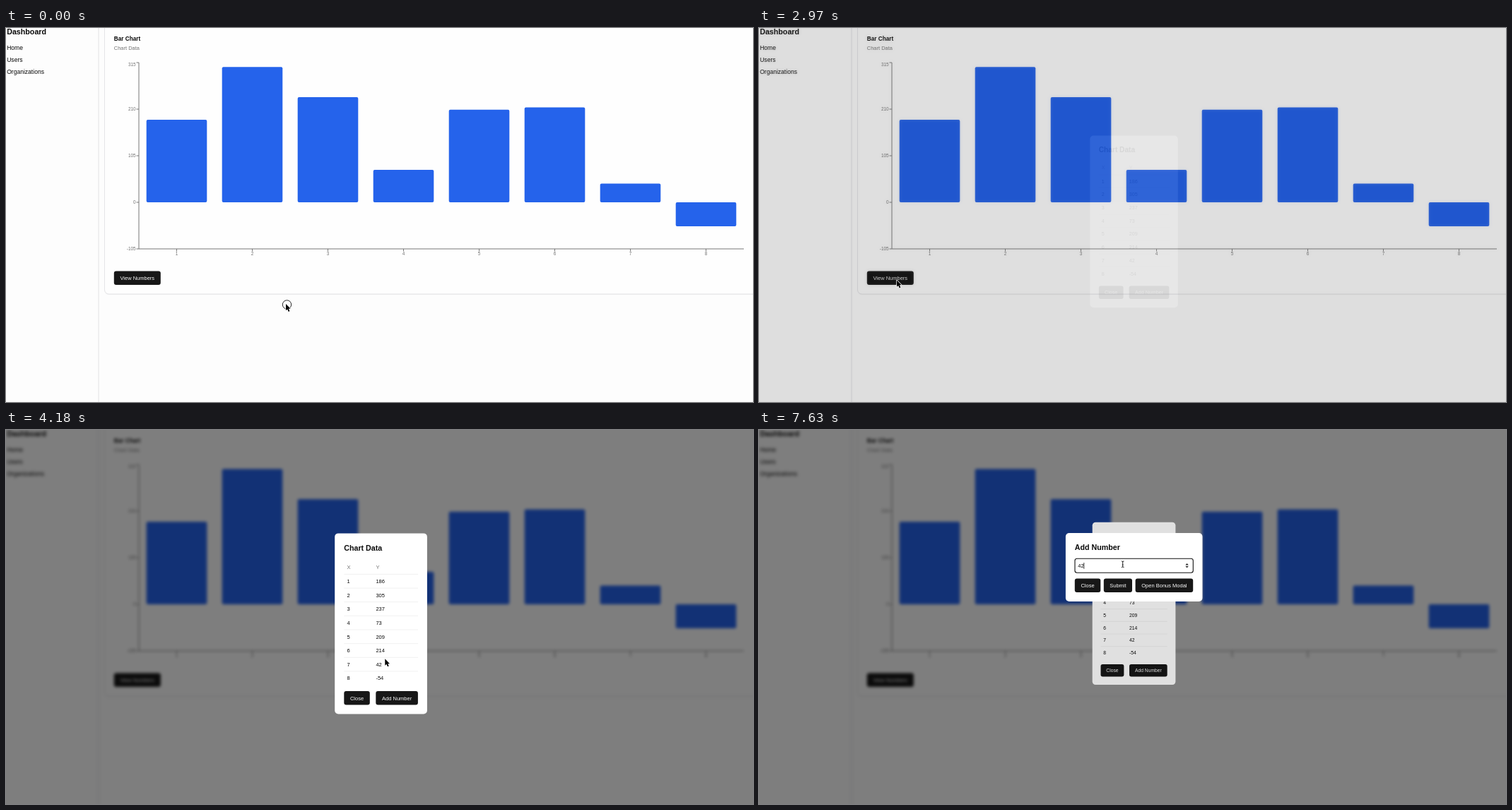
Recreate the animation shown at these times as an HTML page. Size 1057 px wide and 530 px high, loop 7.99 s.

```html
<!DOCTYPE html>
<html lang="en">
<head>
<meta charset="utf-8">
<title>Dashboard</title>
<style>
  html, body { margin: 0; width: 100%; height: 100%; overflow: hidden; background: #fdfdfd; }
  svg { display: block; width: 1057px; height: 530px; }
  text { font-family: "Liberation Sans", Arial, Helvetica, sans-serif; white-space: pre; }
</style>
</head>
<body>
<svg id="stage" viewBox="0 0 1057 530" xmlns="http://www.w3.org/2000/svg"></svg>
<script>
const DURATION = 7990;
const VALUES = [186, 305, 237, 73, 209, 214, 42, -54];
const INK = '#0a0a0a', MUTED = '#737373', DARK = '#171717', AXIS = '#777';

// Text placed by the vertical centre of its capitals.
const label = (x, cy, size, str, { fill = INK, anchor = 'start', weight = 400, id = '' } = {}) =>
  `<text id="${id}" x="${x}" y="${cy + size * 0.36}" font-size="${size}" font-weight="${weight}" fill="${fill}" text-anchor="${anchor}">${str}</text>`;

const box = (x, y, w, h, r, attrs) =>
  `<rect x="${x}" y="${y}" width="${w}" height="${h}" rx="${r}" ${attrs}/>`;

const line = (x1, y1, x2, y2, color) =>
  `<path d="M${x1} ${y1}L${x2} ${y2}" stroke="${color}"/>`;

const button = (x, y, w, str, id = '') =>
  box(x, y, w, 19.5, 3, `id="${id}" fill="${DARK}"`) +
  label(x + w / 2, y + 9.8, 7.5, str, { fill: '#fafafa', anchor: 'middle' });

function chart() {
  const left = 188, band = 107, zero = 247, unit = 66 / 105;
  const bars = VALUES.map((v, i) => {
    const h = Math.abs(v) * unit, x = left + band * i;
    return box(x + 10.7, v > 0 ? zero - h : zero, 85.6, h, 2, 'fill="#2563eb"') +
      line(x + 53.5, 313, x + 53.5, 316.5, AXIS) +
      label(x + 53.5, 320, 6.4, i + 1, { fill: MUTED, anchor: 'middle' });
  });
  const ticks = [315, 210, 105, 0, -105].map(v => {
    const y = zero - v * unit;
    return line(184.5, y, left, y, AXIS) +
      label(183.6, Math.max(y, 51.6), 6.4, v, { fill: MUTED, anchor: 'end' });
  });
  return bars.join('') + ticks.join('') +
    line(left, 49, left, 313, AXIS) + line(left, 313, 1044, 313, AXIS);
}

const page =
  box(-30, -30, 1117, 590, 0, 'fill="#fdfdfd"') +
  line(131, -30, 131, 560, '#e2e2e4') +
  box(139.5, -20, 960, 398, 6, 'fill="#000" opacity=".05"') +
  box(139.5, -20, 960, 397, 6, 'fill="#fefefe" stroke="#e4e4e7"') +
  label(1.2, 5.5, 10.7, 'Dashboard', { weight: 700 }) +
  ['Home', 'Users', 'Organizations'].map((s, i) => label(1.2, 28 + 17.1 * i, 8.55, s)).join('') +
  label(152.8, 15.5, 8.2, 'Bar Chart', { weight: 700 }) +
  label(152.8, 28.6, 7.47, 'Chart Data', { fill: MUTED }) +
  chart() +
  button(152.8, 344.5, 66, 'View Numbers');

const dataModal =
  box(465.2, 146.4, 130.7, 256, 5, 'fill="#fff"') +
  label(478.2, 166.8, 10.7, 'Chart Data', { weight: 700 }) +
  label(482.5, 194, 7.5, 'X', { fill: MUTED }) +
  label(523.5, 194, 7.5, 'Y', { fill: MUTED }) +
  VALUES.map((v, i) => {
    const y = 214.2 + 19.65 * i;
    return line(478.3, y - 9.8, 583, y - 9.8, '#f1f1f1') +
      label(482.5, y, 7.5, i + 1) + label(523.4, y, 7.5, v);
  }).join('') +
  button(478.3, 370, 36.5, 'Close') +
  button(523.3, 370, 59.6, 'Add Number', 'add') +
  box(465.2, 146.4, 130.7, 256, 5, 'id="dim" fill="#000"');

const formModal =
  box(433.9, 146, 193.6, 97, 5, 'fill="#fff"') +
  label(446.7, 166.5, 10.7, 'Add Number', { weight: 700 }) +
  box(447, 182.3, 167.3, 20, 3, 'id="input" fill="#fff"') +
  label(451.3, 192.3, 7.5, 'Enter a number', { fill: MUTED, id: 'hint' }) +
  label(451.3, 192.3, 7.5, '', { id: 'typed' }) +
  box(451.3, 188, 0.8, 8.8, 0, `id="caret" fill="${INK}"`) +
  `<path id="spinner" d="M603.4 191.4l2.2-2.4 2.2 2.4zM603.4 192.9l2.2 2.4 2.2-2.4z" fill="#222"/>` +
  button(446.8, 210.5, 36.5, 'Close') +
  button(487.8, 210.5, 40.2, 'Submit', 'submit') +
  button(532.6, 210.5, 81.6, 'Open Bonus Modal');

// The sharp page stays below; the overlay holds its blurred, shaded copy and the first modal.
document.getElementById('stage').innerHTML = `
  <defs><filter id="blur" filterUnits="userSpaceOnUse" x="-20" y="-20" width="1097" height="570"
    color-interpolation-filters="sRGB"><feGaussianBlur stdDeviation="2.13"/></filter></defs>
  <g id="page">${page}</g>
  <g id="overlay">
    <use href="#page" filter="url(#blur)"/>
    ${box(0, 0, 1057, 530, 0, 'fill="#000" opacity=".5"')}
    <g id="dataModal">${dataModal}</g>
  </g>
  <g id="formModal">${formModal}</g>
  <circle id="ring" cx="397.5" cy="392" r="6.2" fill="none" stroke="#111" stroke-width=".9"/>
  <path id="arrow" d="M0 0V9.3L2.1 7.4 3.7 10.9 5.4 10.2 3.9 6.8H6.7Z"
    fill="#000" stroke="#fff" stroke-width="1.4" paint-order="stroke" stroke-linejoin="round"/>
  <path id="beam" d="M-1.8 -4.4Q0 -4.4 0 -3.2Q0 -4.4 1.8 -4.4M0 -3.5V3.5M-1.8 4.4Q0 4.4 0 3.2Q0 4.4 1.8 4.4M-1 .9H1"
    fill="none" stroke="#111" stroke-width=".9"/>`;

const el = {};
document.querySelectorAll('[id]').forEach(n => { if (n.id) el[n.id] = n; });
const set = (node, attrs) => { for (const k in attrs) node.setAttribute(k, attrs[k]); };
const show = (node, on) => set(node, { visibility: on ? 'visible' : 'hidden' });

const progress = (t, start, length) => Math.min(1, Math.max(0, (t - start) / length));
const smooth = u => u * u * (3 - 2 * u);
const easeOut = u => 1 - (1 - u) ** 2.5;
const fade = (t, start, length) => smooth(progress(t, start, length));

// The CSS "ease" curve, cubic-bezier(.25, .1, .25, 1).
function cssEase(u) {
  const curve = (s, a, b) => 3 * s * (1 - s) ** 2 * a + 3 * s * s * (1 - s) * b + s ** 3;
  let low = 0, high = 1;
  for (let i = 0; i < 16; i++) {
    const mid = (low + high) / 2;
    if (curve(mid, 0.25, 0.25) < u) low = mid; else high = mid;
  }
  return u <= 0 ? 0 : u >= 1 ? 1 : curve(low, 0.1, 1);
}

// Pointer strokes: start, end, from, bend, to, easing.
const STROKES = [
  [20, 850, [396, 391], [425, 402], [473, 399], smooth],
  [870, 1550, [473, 399], [385, 445], [285, 404], smooth],
  [1690, 2410, [285, 404], [200, 404], [195, 357.5], easeOut],
  [3450, 4240, [195, 357.5], [610, 180], [534, 329], smooth],
  [4540, 5160, [534, 329], [582, 358], [558, 378], smooth],
  [5690, 6220, [558, 378], [500, 290], [503, 204], smooth],
  [6220, 6400, [503, 204], [505, 193], [514.7, 190.2], easeOut],
];

function pointer(t) {
  const [start, end, a, b, c, ease] = STROKES.filter(s => t >= s[0]).pop() || STROKES[0];
  const u = ease(progress(t, start, end - start)), v = 1 - u;
  return [0, 1].map(i => v * v * a[i] + 2 * u * v * b[i] + u * u * c[i]);
}

const scaleAbout = (x, y, k, dy = 0) =>
  `translate(${x} ${y + dy}) scale(${k}) translate(${-x} ${-y})`;

const hover = (node, amount) => {
  const c = Math.round(23 + 25 * amount);
  set(node, { fill: `rgb(${c},${c},${c})` });
};

function drawModals(t) {
  const reveal = cssEase(progress(t, 2922, 280));
  set(el.overlay, { opacity: reveal });
  show(el.overlay, reveal > 0);

  const back = cssEase(progress(t, 5505, 280));
  const grow = 0.95 + 0.05 * fade(t, 2955, 150);
  set(el.dataModal, {
    opacity: fade(t, 2920, 150),
    transform: scaleAbout(530.55, 274.5, grow - 0.1 * back, -28.5 * back),
  });
  set(el.dim, { opacity: 0.12 * back });
  set(el.formModal, {
    opacity: back,
    transform: scaleAbout(530.7, 194.5, 0.95 + 0.05 * fade(t, 5540, 150)),
  });
  hover(el.add, fade(t, 4950, 150) - fade(t, 5700, 150));
  hover(el.submit, fade(t, 6040, 130) - fade(t, 6190, 150));
}

function drawInput(t, overInput) {
  const focused = t >= 6450;
  const typed = t >= 7630 ? '42' : t >= 7390 ? '4' : '';
  el.typed.textContent = typed;
  show(el.hint, !typed);
  show(el.caret, focused && (t < 6950 || typed));
  set(el.caret, { x: 451.1 + typed.length * 4.17 });
  set(el.input, { stroke: focused ? '#111' : '#e8e8e8', 'stroke-width': focused ? 1.1 : 0.8 });
  show(el.spinner, overInput);
}

function draw(t) {
  const [x, y] = pointer(t);
  const overInput = t > 6200 && y < 202;
  drawModals(t);
  drawInput(t, overInput);
  show(el.ring, t < 60);
  show(el.arrow, !overInput);
  show(el.beam, overInput);
  set(overInput ? el.beam : el.arrow, { transform: `translate(${x} ${y})` });
}

const began = performance.now();
function tick() {
  draw((performance.now() - began) % DURATION);
  requestAnimationFrame(tick);
}
tick();
</script>
</body>
</html>
```
